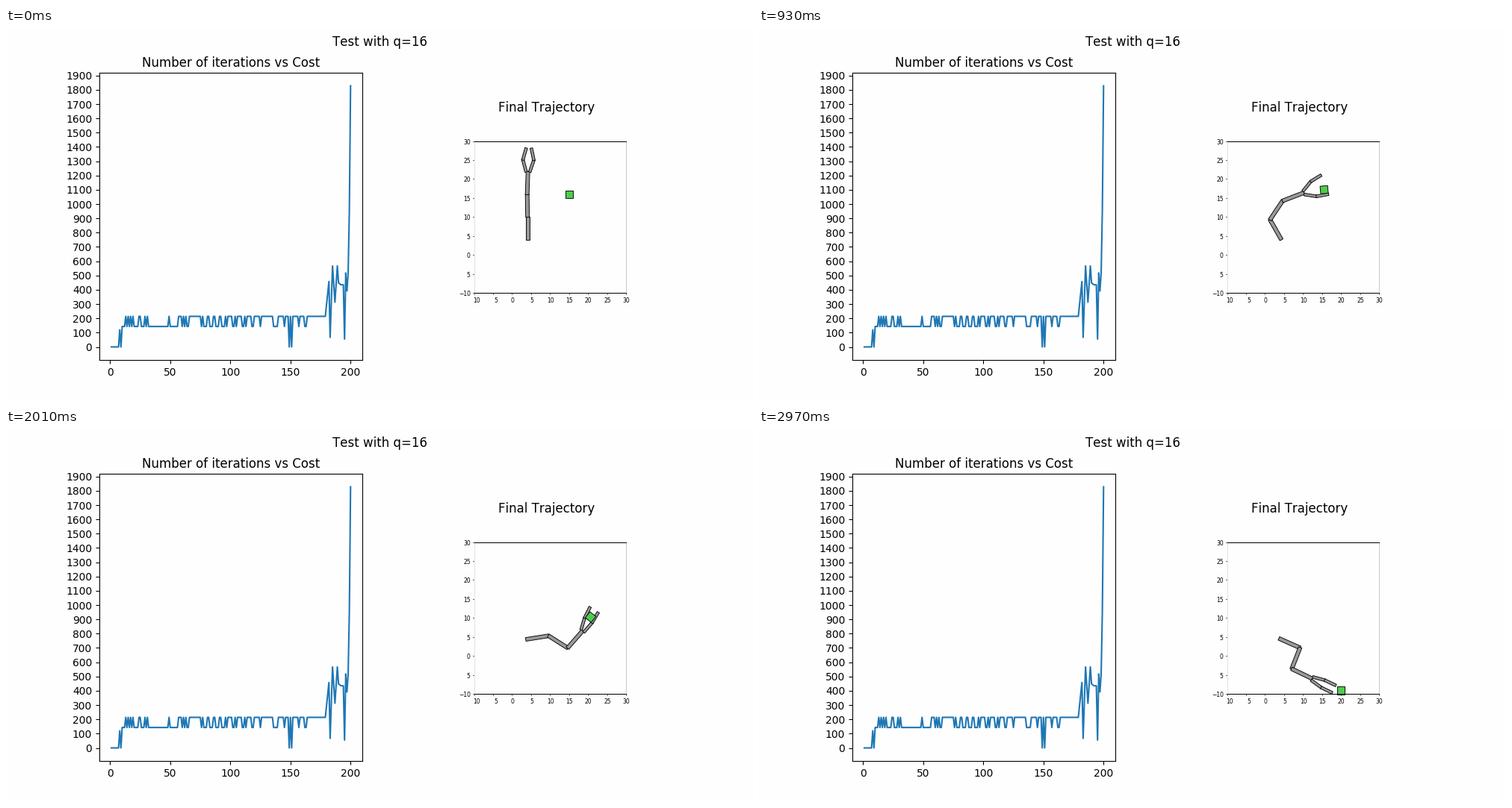
A matplotlib script for the animation above (3000 ms loop, 1000 by 500 pixels).

```python
import matplotlib.pyplot as plt
import numpy as np
from matplotlib.animation import FuncAnimation
from matplotlib.patches import Polygon

FRAMES, INTERVAL = 100, 30
BG = "#fefefe"
GRAY, GREEN = "#999999", "#4dcc4d"
LOW, HIGH = 143, 214

plt.rcParams["font.family"] = "DejaVu Sans"
plt.rcParams["text.kerning_factor"] = 6
fig = plt.figure(figsize=(10, 5), dpi=100, facecolor=BG)
fig.suptitle("Test with q=16")


# ---- cost curve: two levels with regular dips, then a wild climb ----
def cost_curve():
    it = np.arange(201)
    high = it >= 57
    high[13:20:2] = high[29:32:2] = True
    high[24:26] = high[49] = True
    high[60:65:2] = high[65] = high[76] = False
    high[78:96] = np.isin(it[78:96] % 5, (1, 2))
    high[97:120] = ~np.isin(it[97:120] % 8, (1, 6, 7))
    high[125] = high[136:140] = high[145] = False
    high[157] = high[162:164] = False
    cost = np.where(high, HIGH, LOW).astype(float)
    cost[:10] = 0
    cost[8] = 120
    cost[149:152:2] = 0
    climb = [(179, HIGH), (182, 458), (183, 67), (185, 567), (187, 313),
             (189, 567), (190, 448), (192, 435), (194, 435), (195, 55),
             (196, 518), (197, 392), (198, 520), (199, 960), (200, 1828)]
    cost[179:] = np.interp(it[179:], *zip(*climb))
    return it[1:], cost[1:]


left = fig.add_subplot(121, facecolor=BG)
left.plot(*cost_curve(), color="#1f77b4", lw=1.5)
left.set_yticks(range(0, 2000, 100))
left.set_ylim(-0.05 * 1828, 1.05 * 1828)
left.set_title("Number of iterations vs Cost")

# ---- trajectory panel, laid out in stage pixels ----
panel = fig.add_axes([0.5477, 0.231, 0.3523, 0.528])
panel.axis("off")
panel.set_title("Final Trajectory")

ax = fig.add_axes([0, 0, 1, 1])
ax.axis("off")
ax.set_xlim(0, 1000)
ax.set_ylim(500, 0)

X0, X1, Y0, Y1 = 627.0, 830.5, 355.5, 152.0
UNIT = (X1 - X0) / 40


def px(u):
    return X0 + (u + 10) * UNIT


def py(v):
    return Y0 - (v + 10) * UNIT


def stroke(xs, ys, color="black", lw=0.72):
    """Line through pixel centres."""
    ax.plot(np.floor(xs) + 0.5, np.floor(ys) + 0.5, color=color, lw=lw,
            solid_capstyle="projecting", snap=False)


def label(x, y, text, va):
    ax.text(x, y, text, size=5.5, ha="right", va=va)


stroke([X0, X0], [Y0, Y1], "#e2e2e2")
stroke([X1, X1], [Y0, Y1], "#c8c8c8")
stroke([X0, X1], [Y0, Y0])
stroke([X0, X1], [Y1, Y1])

for tick in range(-10, 31, 5):
    stroke([X0 - 2, X0 - 1], [py(tick)] * 2, lw=0.5)
    stroke([px(tick)] * 2, [Y0 + 1, Y0 + 2], lw=0.5)
    digits = str(abs(tick))
    label(X0 - 5.3, py(tick), "\u221210" if tick == -10 else digits,
          "center_baseline")
    half = 2.43 * len(digits) + (3.2 if tick < 0 else 0)
    label(px(tick) + half, Y0 + 5.3, digits, "top")

# ---- motion ----
KEYS = np.array([0, 15, 31, 52, 67, 89, 99], float)
HEADINGS = [  # key poses of the three arm links, degrees
    [90, 103.5, 119.6, 38.8, 9, -12.4, -24],
    [91, 104, 56.3, 0, -32.4, -95.7, -111.4],
    [88, 41.5, 21, 66.8, 49, -9, -25.7],
]
BASE = np.array([698.2, 281.7])
LENGTHS = [28.5, 30.3, 30.3]
REST = np.array([px(15), py(16)])
OPEN, TOUCH, HELD = 15, 27, 31
BLOCK = 2 * UNIT


def ramp(t, a, b):
    return np.clip((t - a) / (b - a), 0, 1)


def ease(t, a, b):
    s = ramp(t, a, b)
    return s * s * (3 - 2 * s)


def spline(t, vals):
    """Cubic Hermite curve through the key poses."""
    slope = np.gradient(np.array(vals, float), KEYS)
    i = min(np.searchsorted(KEYS, t, side="right"), len(KEYS) - 1) - 1
    h = KEYS[i + 1] - KEYS[i]
    s = (t - KEYS[i]) / h
    return ((1 + 2 * s) * (1 - s)**2 * vals[i]
            + s * (1 - s)**2 * h * slope[i]
            + s * s * (3 - 2 * s) * vals[i + 1]
            + s * s * (s - 1) * h * slope[i + 1])


def axes_of(deg):
    a = np.radians(deg)
    along = np.array([np.cos(a), -np.sin(a)])
    across = np.array([-np.sin(a), -np.cos(a)])
    return along, across


def bar(start, length, deg, width, tail=0.5, head=0.5):
    """Corners of a rotated bar and its far joint."""
    along, across = axes_of(deg)
    end = start + along * length
    a, b, w = start - along * tail, end + along * head, across * width / 2
    return [a + w, b + w, b - w, a - w], end


def finger_angles(t):
    """Spread of the finger bases, inward curl of the tips, common lean."""
    if t < OPEN:
        spread = 17 + 47 * ease(t, 0, OPEN)
    else:
        spread = 10 + 54 * np.exp((OPEN - t) / 16)
    curl = 31 - 21 * ease(t, OPEN, 45)
    lean = 14 * np.exp(-((t - 62) / 14)**2)
    return spread, curl, lean


def arm(t):
    bars, joint = [], BASE
    for n, (vals, length) in enumerate(zip(HEADINGS, LENGTHS)):
        deg = spline(t, vals)
        corners, joint = bar(joint, length, deg, 4.9, 2.5 if n == 0 else 0.5)
        bars.append(corners)
    across = axes_of(deg)[1]
    spread, curl, lean = finger_angles(t)
    for side in (1, -1):
        p = joint + across * side * 2.5
        for turn, length in ((spread, 16.5), (spread - curl, 16)):
            corners, p = bar(p, length, deg + lean + side * turn, 3.6)
            bars.append(corners)
    return bars, joint, deg


def held_block(t):
    """Block carried by the gripper, pushed out and laid flat at the end."""
    _, joint, deg = arm(t)
    along, across = axes_of(deg)
    loose = 1 - ease(t, HELD, HELD + 15)
    push = ramp(t, 67, 99)
    center = (joint + along * (21 + 6 * loose + 21 * push)
              + across * (4 - 10 * loose - 3 * push))
    center[1] = min(center[1], Y0 - BLOCK / 2)
    turn = 3 - 19 * loose - 16 * push
    return center, (deg + turn) * (1 - ease(t, 90, 99))


def block(t):
    center, deg = held_block(max(t, HELD))
    mix = ramp(t, TOUCH, HELD)
    center, deg = REST + (center - REST) * mix, deg * mix
    start = center - axes_of(deg)[0] * BLOCK / 2
    return bar(start, BLOCK, deg, BLOCK, 0, 0)[0]


def piece(color):
    return ax.add_patch(Polygon([(0, 0), (1, 0), (1, 1)], closed=True,
                                fc=color, ec="black", lw=0.65))


arm_parts = [piece(GRAY) for _ in range(7)]
block_part = piece(GREEN)


def update(t):
    for part, corners in zip(arm_parts, arm(t)[0]):
        part.set_xy(corners)
    block_part.set_xy(block(t))
    return arm_parts + [block_part]


anim = FuncAnimation(fig, update, frames=FRAMES, interval=INTERVAL,
                     init_func=lambda: update(0), repeat=True)
plt.show()
```
